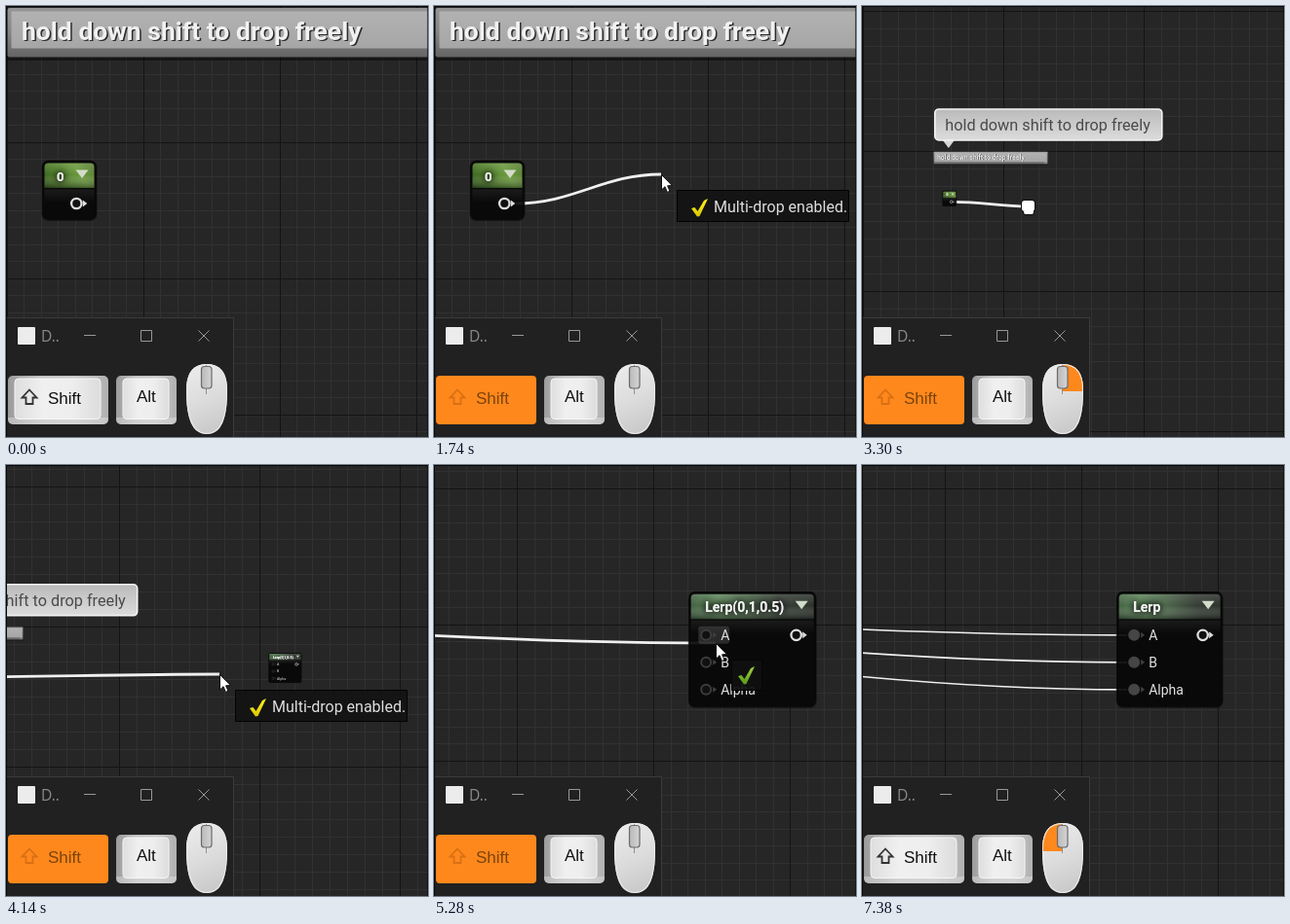
An HTML page with a canvas for the animation above (7440 ms loop, 433x443 px).

```html
<!DOCTYPE html>
<html lang="en">
<head>
<meta charset="utf-8">
<title>Multi-drop</title>
<style>
html, body { margin: 0; width: 100%; height: 100%; overflow: hidden; background: #262626; }
canvas { display: block; width: 433px; height: 443px; }
</style>
</head>
<body>
<canvas id="stage"></canvas>
<script>
const W = 433, H = 443, LOOP = 7440, TICK = 60;
const canvas = document.getElementById('stage');
const dpr = window.devicePixelRatio || 1;
canvas.width = W * dpr;
canvas.height = H * dpr;
const c = canvas.getContext('2d');

const ORANGE = '#ff881c';
const NOTE = 'hold down shift to drop freely';
const FAR = 9 / 35;

// Time tables: [ms, value...]
const zooms = [
  [0, 1], [2040, 6 / 7], [2280, 27 / 35], [2640, 4 / 7], [2760, 3 / 7], [2880, 2 / 7], [2940, FAR],
  [4440, 2 / 7], [4500, 3 / 7], [4620, 4 / 7], [4860, 27 / 35], [4980, 6 / 7], [5100, 1]
];
const pointer = [
  [60, 388, 89], [600, 72, 203], [780, 72, 203], [1260, 218, 174], [1500, 218, 174], [1680, 233, 173],
  [2940, 233, 173], [3120, 270, 185], [3300, 170, 206], [3480, 112, 208], [3540, 112, 208],
  [3780, 334, 200], [4080, 219, 215], [4140, 219, 215], [4380, 272, 215], [5160, 272, 215],
  [5280, 289, 183], [5460, 283, 178], [5640, 283, 178], [5880, 283, 206], [6060, 283, 206],
  [6300, 283, 234], [6540, 283, 234], [7080, 440, 86]
];
const pan = [
  [3120, 0, 0], [3300, -100, 20.6], [3480, -158, 22.6], [3780, -158, 22.6], [4080, -273, 37.5]
];
const leftDown = [[780, 1620], [5520, 5580], [5940, 6060], [6420, 6480], [7380, LOOP]];
const rightDown = [[3120, 3540], [3780, 4140]];
const wheelOn = [[1980, 2100], [2280, 2340], [2580, 2700], [2760, 2820], [2880, 3000],
  [4440, 4620], [4860, 5160]];
const shiftDown = [[1320, 6540]];
const joins = [5580, 6060, 6480];
const titles = ['Lerp(0,1,0.5)', 'Lerp(,1,0.5)', 'Lerp(,,0.5)', 'Lerp'];
const widths = [129, 121, 113, 107];

const mix = (a, b, k) => a + (b - a) * k;
const during = (spans, t) => spans.some(([a, b]) => t >= a && t < b);
const snap = v => Math.ceil(v - 0.5);

function along(keys, t) {
  let i = keys.findIndex(k => k[0] > t);
  if (i === 0) return keys[0].slice(1);
  if (i < 0) return keys[keys.length - 1].slice(1);
  const a = keys[i - 1], b = keys[i];
  let k = (t - a[0]) / (b[0] - a[0]);
  k = k * k * (3 - 2 * k);
  return [mix(a[1], b[1], k), mix(a[2], b[2], k)];
}

function camera(t) {
  const s = zooms.filter(z => z[0] <= t).pop()[1];
  if (t < 4140) {
    const [px, py] = along(pan, t);
    return { s, x: 233 * (1 - s) + px, y: 173 * (1 - s) + py };
  }
  const k = s / FAR;
  return { s, x: 272.4 + (-100 - 272.4) * k, y: 215.2 + (166 - 215.2) * k };
}

// Drawing helpers
function paint(fill, stroke, lw = 1) {
  if (fill) { c.fillStyle = fill; c.fill(); }
  if (stroke) { c.strokeStyle = stroke; c.lineWidth = lw; c.stroke(); }
}
function box(x, y, w, h, r, fill, stroke, lw) {
  c.beginPath();
  c.roundRect(x, y, w, h, r);
  paint(fill, stroke, lw);
}
function shape(points, fill, stroke, lw) {
  c.beginPath();
  points.forEach(([x, y]) => c.lineTo(x, y));
  c.closePath();
  paint(fill, stroke, lw);
}
function disc(x, y, r, fill, stroke, lw) {
  c.beginPath();
  c.arc(x, y, r, 0, 7);
  paint(fill, stroke, lw);
}
function line(x0, y0, x1, y1, col, lw) {
  c.beginPath();
  c.moveTo(x0, y0);
  c.lineTo(x1, y1);
  paint(null, col, lw);
}
function grad(x0, y0, x1, y1, ...stops) {
  const g = c.createLinearGradient(x0, y0, x1, y1);
  stops.forEach((col, i) => g.addColorStop(i / (stops.length - 1), col));
  return g;
}
function text(str, x, y, font, fill) {
  c.font = font;
  c.fillStyle = fill;
  c.fillText(str, x, y);
}

function grid(cam) {
  c.fillStyle = '#262626';
  c.fillRect(0, 0, W, H);
  let cell = 17.5 * cam.s;
  while (cell <= 10.01) cell *= 2;
  const ox = cam.x + 281 * cam.s, oy = cam.y;
  for (const major of [false, true]) {
    c.fillStyle = major ? '#141414' : '#313131';
    for (let i = Math.ceil(-ox / cell); ox + i * cell < W; i++)
      if ((i % 8 === 0) === major) c.fillRect(snap(ox + i * cell), 0, 1, H);
    for (let i = Math.ceil(-oy / cell); oy + i * cell < H; i++)
      if ((i % 8 === 0) === major) c.fillRect(0, snap(oy + i * cell), W, 1);
  }
}

function wire(x0, y0, x1, y1, lw) {
  const d = (Math.abs(x1 - x0) + Math.abs(y1 - y0)) / 3;
  c.beginPath();
  c.moveTo(x0, y0);
  c.bezierCurveTo(x0 + d, y0, x1 - d, y1, x1, y1);
  paint(null, '#f0f0f0', lw);
}

function comment() {
  box(0.5, 2, 457.5, 54, 3, 'rgba(0,0,0,.45)');
  box(1.5, 2, 455.5, 50.5, 2, grad(0, 2, 0, 52.5, '#959595', '#858585', '#646464'));
  box(5.5, 5.5, 448, 38, 1, grad(0, 5, 0, 43, '#b2b2b2', '#a6a6a6'));
  for (const d of [4, 8, 12]) line(454 - d, 50, 454, 50 - d, '#d0d0d0', 1.2);
  const font = 'bold 26.5px Roboto, sans-serif';
  text(NOTE, 17.5, 36, font, '#2b2b2b');
  text(NOTE, 16, 34.5, font, '#f1f1f1');
}

function bubble(cam) {
  const x = cam.x + 1.2 * cam.s + 0.4, y = cam.y + 2 * cam.s - 44.7;
  shape([[x + 9, y + 33], [x + 21, y + 33], [x + 15, y + 41]], '#d8d8d8');
  box(x + 1, y + 1, 233, 32, 4, grad(0, y, 0, y + 33, '#b9b9b9', '#dcdcdc'), '#f4f4f4', 1.6);
  text(NOTE, x + 11.5, y + 23, '16.25px Roboto, sans-serif', '#4a4a4a');
}

function outPin(x, y, hover) {
  if (hover) box(x - 16, y - 10, 32, 20, 3, 'rgba(255,255,255,.12)');
  disc(x, y, 5.2, '#111', '#dedede', 2.3);
  shape([[x + 6.5, y - 3.5], [x + 11, y], [x + 6.5, y + 3.5]], '#dedede');
}

function node(x, y, w, h, title, size, colors) {
  box(x - 1.5, y - 1, w + 3, h + 3, 7, 'rgba(0,0,0,.5)');
  box(x, y, w, h, 6, 'rgba(8,8,8,.84)', '#080808', 1.5);
  const top = [4, 4, 0, 0];
  box(x + 1.5, y + 2, w - 3, 25.5, top, grad(x, y + 28, x + w, y, ...colors));
  box(x + 1.5, y + 2, w - 3, 25.5, top,
    grad(0, y, 0, y + 28, 'rgba(255,255,255,.16)', 'rgba(255,255,255,0)', 'rgba(0,0,0,.45)'));
  box(x + 1.5, y + 29, w - 3, 14, 0, grad(0, y + 29, 0, y + 43, 'rgba(255,255,255,.07)', 'rgba(255,255,255,0)'));
  const r = x + w;
  shape([[r - 20.5, y + 9], [r - 7.5, y + 9], [r - 14, y + 17.5]], '#d3dccb');
  c.save();
  c.shadowColor = '#000';
  c.shadowBlur = 7;
  for (let i = 0; i < 2; i++)
    text(title, x + (w < 60 ? 14 : 16), y + 20, `bold ${size}px Roboto, sans-serif`, '#f2f2f2');
  c.restore();
}

function lerpNode(joined, hover) {
  const x = 1438, y = 107, w = widths[joined];
  node(x, y, w, 117, titles[joined], 14, ['#3f5c3e', '#5c8659', '#4a6348', '#343c34', '#2b302b']);
  ['A', 'B', 'Alpha'].forEach((name, i) => {
    const py = y + 44 + 28 * i;
    if (hover === i) box(x + 9, py - 9, 32, 18, 3, 'rgba(255,255,255,.13)');
    const on = i < joined;
    disc(x + 17, py, 5, on ? '#454545' : '#101010', on ? '#454545' : '#3c3c3c', 2);
    shape([[x + 24, py - 3], [x + 28, py], [x + 24, py + 3]], '#3f3f3f');
    text(name, x + 32, py + 5, '14px Roboto, sans-serif', '#e2e2e2');
  });
  outPin(x + w - 19.5, y + 44, false);
}

function tick(x, y, col) {
  shape([[x, y + 10], [x + 3.5, y + 9], [x + 6.5, y + 13], [x + 13, y + 2], [x + 17, y],
    [x + 8.5, y + 18], [x + 6, y + 18.5]], col);
}

function tip(x, y, kind) {
  if (kind === 'ok') {
    box(x + 0.5, y + 0.5, 31, 31, 0, 'rgba(16,16,16,.93)', '#050505');
    tick(x + 7, y + 7, grad(0, y + 7, 0, y + 24, '#a2d63c', '#5c9a1e'));
    return;
  }
  const multi = kind === 'multi';
  box(x + 0.5, y - 0.5, multi ? 176 : 168, 32, 0, 'rgba(20,20,20,.94)', '#020202');
  if (multi) tick(x + 15, y + 8, grad(0, y + 8, 0, y + 26, '#fff51e', '#dcc800'));
  else {
    box(x + 14, y + 10, 16, 12, 2, '#555', '#ddd', 1.3);
    line(x + 22, y + 12.5, x + 22, y + 19.5, '#eee', 1.6);
    line(x + 18.5, y + 16, x + 25.5, y + 16, '#eee', 1.6);
  }
  text(multi ? 'Multi-drop enabled.' : 'Place a new node.', x + 38, y + 21.5, '16px Roboto, sans-serif', '#dedede');
}

function drawCursor(x, y, kind) {
  c.save();
  c.translate(x, y);
  if (kind === 'hand') {
    c.beginPath();
    c.roundRect(-6, -6, 13, 11, 3);
    c.roundRect(-4, 0, 10, 8, 2);
    paint(null, '#111', 2);
    paint('#fff');
  } else if (kind === 'cross') {
    for (const [col, lw] of [['#000', 3], ['#fff', 1]]) {
      line(-11, 0, 11, 0, col, lw);
      line(0, -11, 0, 11, col, lw);
    }
  } else {
    shape([[0.5, 0.5], [0.5, 16], [4, 12.7], [6.4, 18.4], [9, 17.3], [6.6, 11.8], [11.4, 11.6]], '#fff', '#111');
  }
  c.restore();
}

function key(x, w, label, lx, ly, pressed) {
  if (pressed) box(x, 380, w, 50, 4, ORANGE);
  else {
    box(x, 380, w, 50, 5, grad(x, 0, x + w, 0, '#9b9b9b', '#c4c4c4', '#c9c9c9', '#b0b0b0'));
    box(x, 423, w, 7, [0, 0, 5, 5], 'rgba(225,225,225,.45)');
    box(x + 7, 383, w - 15, 41.5, 4, grad(x + 7, 0, x + w - 8, 0, '#dedede', '#f0f0f0', '#eeeeee', '#dcdcdc'), '#f6f6f6');
  }
  text(label, lx, ly, '17px "Liberation Sans", Arial, sans-serif', pressed ? '#7b430c' : '#111');
}

function mouse(left, right, wheel) {
  const body = new Path2D('M206 368C220 368 227 377 227 395C227 424 221 440 206 440C191 440 185 424 185 395C185 377 192 368 206 368Z');
  c.save();
  c.fillStyle = grad(190, 368, 222, 440, '#ececec', '#dcdcdc', '#c6c6c6');
  c.fill(body);
  c.clip(body);
  if (left) { c.fillStyle = ORANGE; c.fillRect(185, 368, 21, 29); }
  if (right) { c.fillStyle = ORANGE; c.fillRect(206, 368, 21, 28); }
  line(205.5, 368, 205.5, 399, '#8e8e8e');
  c.strokeStyle = '#e9e9e9';
  c.lineWidth = 2;
  c.stroke(body);
  c.restore();
  box(200.5, 370.5, 10.5, 22.5, 3, grad(200, 0, 211, 0, '#b8b8b8', '#d4d4d4'), '#6a6a6a', 1.2);
  if (wheel) disc(205.7, 385, 3.7, ORANGE);
}

function keyWindow(t) {
  box(0.5, 320.5, 233, 124, 0, '#212121', '#3b3b3b');
  box(12, 330, 18, 18, 1, '#ececec');
  text('D..', 36, 345, '15.5px "Open Sans", sans-serif', '#8b8b8b');
  const grey = '#989898';
  line(80, 338.5, 92, 338.5, grey);
  box(138.5, 333.5, 11, 11, 0, null, grey);
  line(197.5, 333.5, 208.5, 344.5, grey);
  line(208.5, 333.5, 197.5, 344.5, grey);
  const held = during(shiftDown, t);
  key(2, 103, 'Shift', 43, 409, held);
  shape([[24, 394.5], [31.5, 402.5], [27.5, 402.5], [27.5, 409], [20.5, 409], [20.5, 402.5], [16.5, 402.5]],
    null, held ? '#d97014' : '#333', 1.8);
  key(113, 62, 'Alt', 134, 407, false);
  mouse(during(leftDown, t), during(rightDown, t), during(wheelOn, t));
}

function draw(t) {
  c.setTransform(dpr, 0, 0, dpr, 0, 0);
  const cam = camera(t), { s } = cam;
  const [mx, my] = along(pointer, t);
  const late = t >= 4140, panning = during(rightDown, t);
  const dragging = t >= 840 && t < joins[2];
  const joined = joins.filter(j => j <= t).length;

  let hover = -1;
  if (t >= 5220 && t < 6600 && mx < 303)
    hover = [175, 203, 231].findIndex(y => Math.abs(my - y) < 10);
  const onOut = t >= 60 && t < 840 && Math.hypot(mx - 72, my - 203) < 12;

  grid(cam);
  const k = (s - FAR) / (1 - FAR);
  const sx = late ? mix(-78.4, -861, k) : cam.x + 84 * s;
  const sy = late ? mix(218.2, 133, k) : cam.y + 203 * s;

  const inWorld = fn => {
    c.save();
    c.translate(cam.x, cam.y);
    c.scale(s, s);
    fn();
    c.restore();
  };
  inWorld(comment);
  for (let i = 0; i < joined; i++)
    wire(sx, sy, cam.x + 1448 * s, cam.y + (151 + 28 * i) * s, 1.6);
  if (dragging) wire(sx, sy, mx, my, 2.8);
  inWorld(() => {
    node(38, 159.5, 54, 59.5, '0', 13, ['#345a1a', '#4f7f29', '#6b9a3d', '#54782f']);
    outPin(72.3, 203, onOut);
    lerpNode(joined, hover);
  });
  if (s < 0.8 && cam.x > -300) bubble(cam);

  keyWindow(t);
  if (dragging && !panning)
    tip(Math.round(mx) + 16, Math.round(my) + 17, hover >= 0 ? 'ok' : t < 1620 ? 'new' : 'multi');
  if (t >= 60 && t < 7080)
    drawCursor(mx, my, panning ? 'hand' : onOut ? 'cross' : 'arrow');

  c.fillStyle = '#080808';
  c.fillRect(0, 0, W, 1);
  c.fillRect(0, 0, 1, H);
  c.fillStyle = 'rgba(8,8,8,.6)';
  c.fillRect(W - 1, 0, 1, H);
}

const start = performance.now();
function frame() {
  const t = (performance.now() - start) % LOOP;
  draw(Math.floor(t / TICK) * TICK);
  requestAnimationFrame(frame);
}
frame();
</script>
</body>
</html>
```
